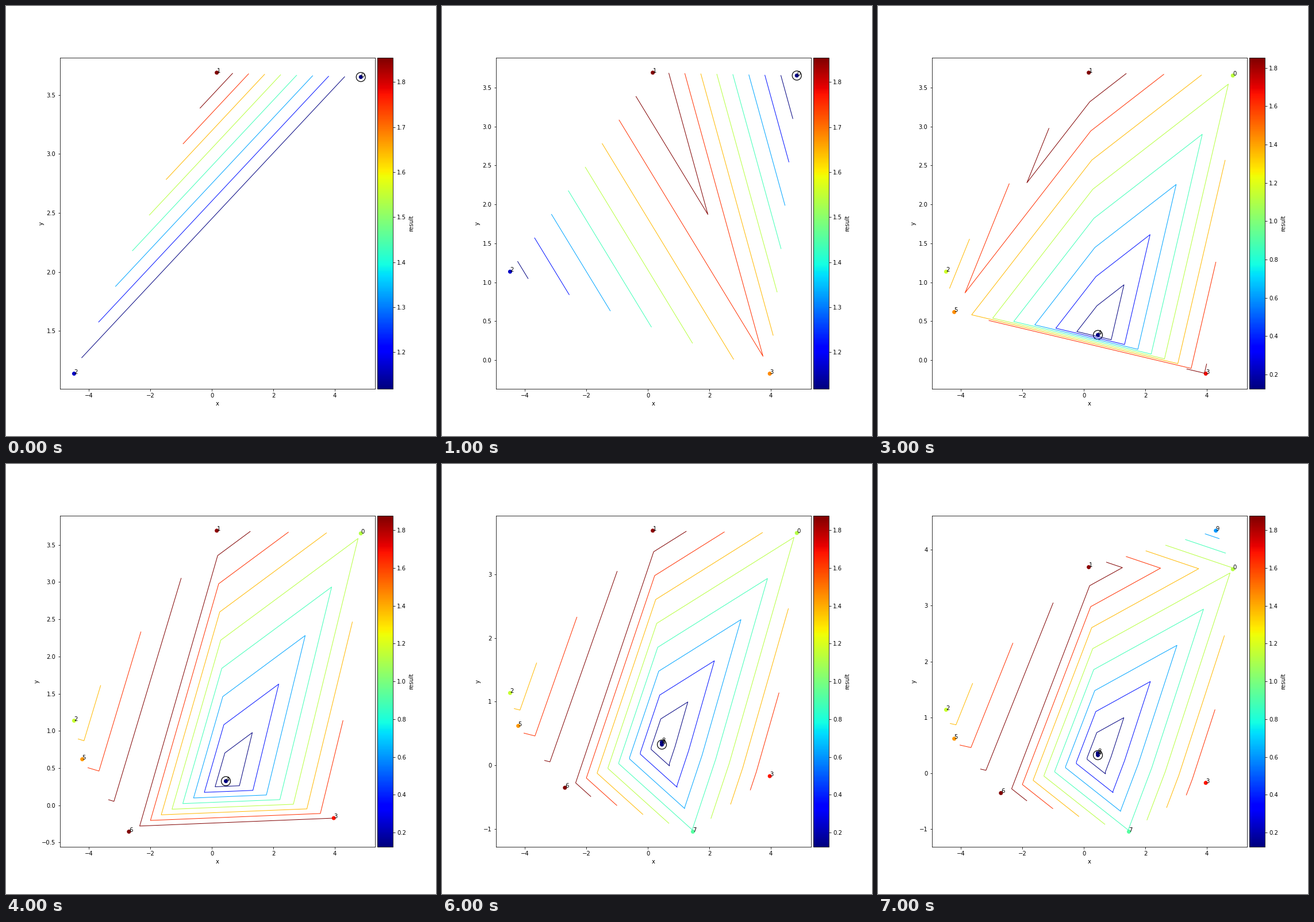
These frames come from a looping animation (748x748 px, 8 s). A matplotlib script:

```python
import numpy as np
import matplotlib.pyplot as plt
from matplotlib.animation import FuncAnimation
from mpl_toolkits.axes_grid1 import make_axes_locatable

SIZE, DPI = 748, 72
FIRST = 3  # samples known at the start
LEVELS = 10

# Places sampled by the search, in order
SPOTS = [(4.842, 3.653), (0.158, 3.690), (-4.481, 1.137), (3.962, -0.1715),
         (0.455, 0.325), (-4.215, 0.619), (-2.698, -0.3536),
         (1.462, -1.0445), (0.451, 0.360), (4.291, 4.343)]


def griewank(x, y):
    return 1 + (x**2 + y**2) / 4000 - np.cos(x) * np.cos(y / np.sqrt(2))


def padded(values):
    pad = 0.05 * np.ptp(values)
    return values.min() - pad, values.max() + pad


fig = plt.figure(figsize=(SIZE / DPI, SIZE / DPI), dpi=DPI)


def draw(step):
    x, y = np.array(SPOTS[:FIRST + step]).T
    z = griewank(x, y)
    fig.clear()
    ax = fig.add_subplot()
    cax = make_axes_locatable(ax).append_axes("right", size="5%", pad=0.05)

    levels = np.linspace(z.min(), z.max(), LEVELS)[1:-1]
    ax.tricontour(x, y, z, levels=levels, cmap="jet", linewidths=1)
    dots = ax.scatter(x, y, c=z, cmap="jet")
    fig.colorbar(dots, cax=cax, label="result")

    best = z.argmin()
    ax.scatter(x[best], y[best], s=256, facecolors="none",
               edgecolors="black", linewidths=1.2)
    for i, spot in enumerate(zip(x, y)):
        ax.annotate(str(i), spot)
    ax.set(xlabel="x", ylabel="y", xlim=padded(x), ylim=padded(y))
    return []


steps = len(SPOTS) - FIRST + 1
anim = FuncAnimation(fig, draw, frames=steps, interval=1000,
                     repeat=True, repeat_delay=0, blit=False)
plt.show()
```
